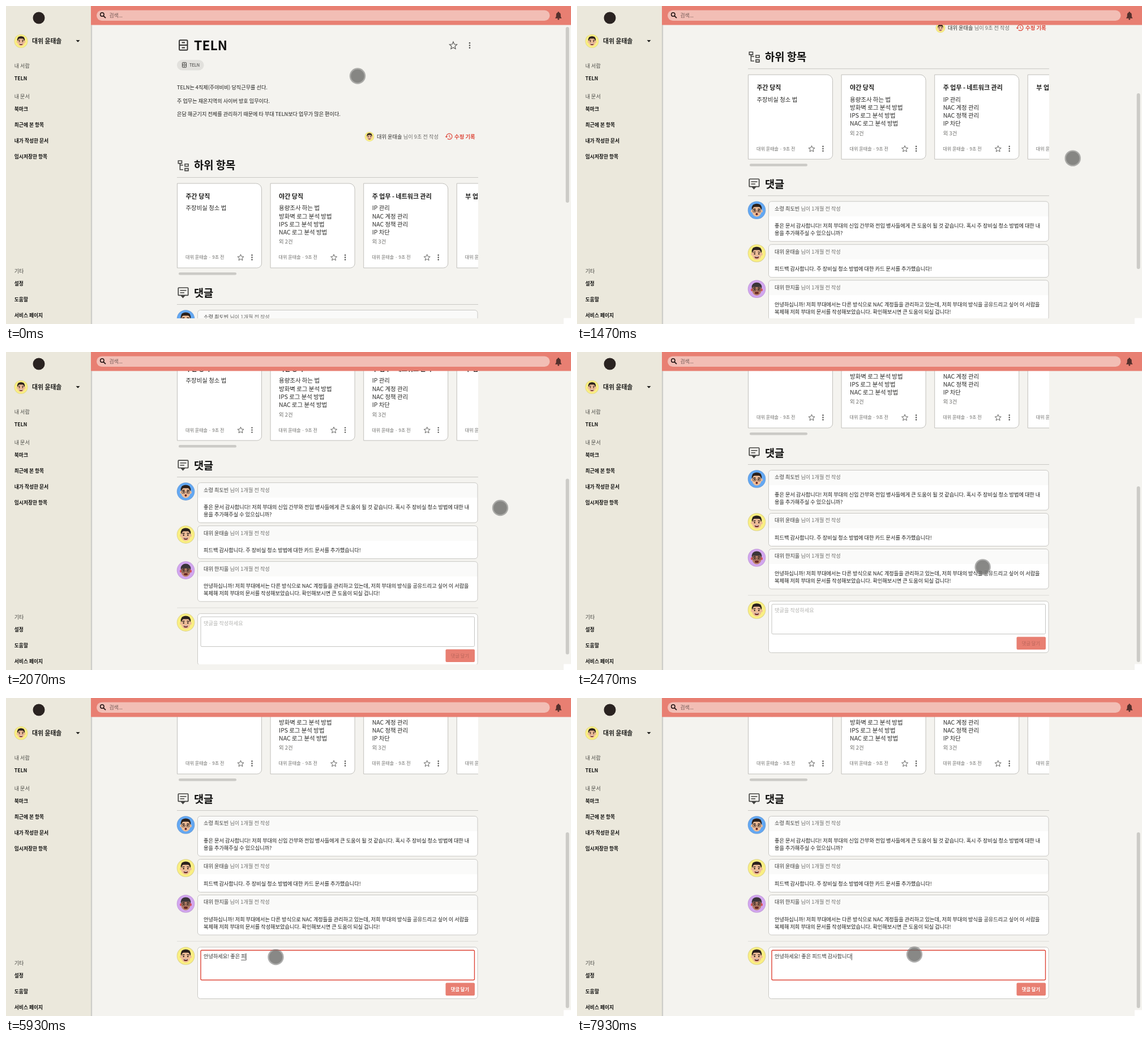
An HTML page with a canvas for the animation above (8 s loop, 998x561 px).

```html
<!DOCTYPE html>
<html lang="ko">
<head>
<meta charset="utf-8">
<title>문서 서랍</title>
<style>
html, body { margin: 0; width: 100%; height: 100%; overflow: hidden; background: #f4f3ef; }
canvas { display: block; width: 998px; height: 561px; }
</style>
</head>
<body>
<canvas id="stage"></canvas>
<script>
const W = 998, H = 561, LOOP = 8000, STEP = 1000 / 15;
const canvas = document.getElementById('stage');
const ctx = canvas.getContext('2d');
const ratio = window.devicePixelRatio || 1;
canvas.width = W * ratio;
canvas.height = H * ratio;

const FONT = '"Noto Sans CJK KR", "Noto Sans CJK", "Noto Sans", sans-serif';
const INK = '#1d1d1b', GREY = '#6f6f6c', CORAL = '#e87f72', RED = '#dd4436', LINE = '#c9c8c4';
const ME = '대위 윤태솔', TEAM = 'TELN';

// [time, value...] keys, linear in between
const SCROLL = [[1000, 0], [1133, 5], [1200, 16], [1333, 92], [1467, 192], [1533, 208],
  [1600, 208], [1733, 211], [1800, 215.5], [1933, 260], [2067, 306], [2200, 328]];
const POINTER = [[133, 621, 123.5], [400, 770, 160], [667, 888, 211], [1000, 888, 211], [1200, 886.5, 243],
  [1533, 873, 275], [2133, 873, 275], [2467, 716.5, 379.5], [2600, 560, 450], [2733, 476, 474],
  [3067, 476, 474], [3333, 476.5, 457], [7800, 476.5, 457], [7933, 596, 452.5]];

// [time, committed text, syllable being composed]
const TYPING = [[3600, '', 'ㅇ'], [3870, '', '아'], [3930, '', '안'], [4070, '안', 'ㄴ'], [4130, '안', '녀'],
  [4200, '안', '녕'], [4270, '안녕', 'ㅎ'], [4330, '안녕', '하'], [4470, '안녕', '핫'], [4530, '안녕하', '세'],
  [4600, '안녕하', '셍'], [4730, '안녕하세', '요'], [5000, '안녕하세요!', ''], [5200, '안녕하세요! ', ''],
  [5270, '안녕하세요! ', 'ㅈ'], [5330, '안녕하세요! ', '조'], [5470, '안녕하세요! ', '좋'],
  [5600, '안녕하세요! 좋', '으'], [5670, '안녕하세요! 좋', '은'], [5800, '안녕하세요! 좋은 ', ''],
  [5930, '안녕하세요! 좋은 ', '피'], [6000, '안녕하세요! 좋은 ', '핃'], [6070, '안녕하세요! 좋은 피', '드'],
  [6200, '안녕하세요! 좋은 피', '듭'], [6270, '안녕하세요! 좋은 피드', '배'], [6330, '안녕하세요! 좋은 피드', '백'],
  [6530, '안녕하세요! 좋은 피드백 ', ''], [6600, '안녕하세요! 좋은 피드백 ', 'ㄱ'], [6670, '안녕하세요! 좋은 피드백 ', '가'],
  [6730, '안녕하세요! 좋은 피드백 ', '감'], [6870, '안녕하세요! 좋은 피드백 감', 'ㅅ'],
  [6930, '안녕하세요! 좋은 피드백 감', '사'], [7070, '안녕하세요! 좋은 피드백 감사', '하'],
  [7200, '안녕하세요! 좋은 피드백 감사', '합'], [7330, '안녕하세요! 좋은 피드백 감사합', '니'],
  [7470, '안녕하세요! 좋은 피드백 감사합니', '다'], [7870, '안녕하세요! 좋은 피드백 감사합니다', '']];

function track(keys, t) {
  const i = keys.findIndex(k => k[0] > t);
  if (i === 0) return keys[0].slice(1);
  if (i < 0) return keys[keys.length - 1].slice(1);
  const a = keys[i - 1], b = keys[i], p = (t - a[0]) / (b[0] - a[0]);
  return a.slice(1).map((v, n) => v + (b[n + 1] - v) * p);
}

// y is the optical middle of the line; returns the end x
function text(s, x, y, size, color = INK, weight = 400) {
  ctx.font = `${weight} ${size}px ${FONT}`;
  ctx.fillStyle = color;
  ctx.fillText(s, x, y + size * 0.37);
  return x + ctx.measureText(s).width;
}

function box(x, y, w, h, r, fill, stroke, lw = 1) {
  ctx.beginPath();
  ctx.roundRect(x, y, w, h, r);
  if (fill) { ctx.fillStyle = fill; ctx.fill(); }
  if (stroke) { ctx.strokeStyle = stroke; ctx.lineWidth = lw; ctx.stroke(); }
}

function oval(x, y, rx, ry, fill) {
  ctx.beginPath();
  ctx.ellipse(x, y, rx, ry, 0, 0, Math.PI * 2);
  ctx.fillStyle = fill;
  ctx.fill();
}

const disc = (x, y, r, fill) => oval(x, y, r, r, fill);

function lines(color, lw, ...paths) {
  ctx.strokeStyle = color;
  ctx.lineWidth = lw;
  ctx.beginPath();
  for (const p of paths) {
    ctx.moveTo(p[0], p[1]);
    for (let i = 2; i < p.length; i += 2) ctx.lineTo(p[i], p[i + 1]);
  }
  ctx.stroke();
}

function poly(fill, ...p) {
  ctx.beginPath();
  for (let i = 0; i < p.length; i += 2) ctx.lineTo(p[i], p[i + 1]);
  ctx.closePath();
  ctx.fillStyle = fill;
  ctx.fill();
}

function star(x, y, r) {
  ctx.beginPath();
  for (let i = 0; i < 10; i++) {
    const a = -Math.PI / 2 + i * Math.PI / 5, d = i % 2 ? r * 0.45 : r;
    ctx.lineTo(x + d * Math.cos(a), y + d * Math.sin(a));
  }
  ctx.closePath();
  ctx.strokeStyle = '#575755';
  ctx.lineWidth = r * 0.16;
  ctx.stroke();
}

function dots(x, y, gap) {
  for (const d of [-gap, 0, gap]) disc(x, y + d, gap * 0.3, '#4c4c4a');
}

function cabinet(x, y, s) {
  box(x - 0.37 * s, y - 0.45 * s, 0.74 * s, 0.9 * s, 0.08 * s, null, '#333331', 0.1 * s);
  lines('#333331', 0.1 * s, [x - 0.37 * s, y, x + 0.37 * s, y],
    [x - 0.14 * s, y - 0.23 * s, x + 0.14 * s, y - 0.23 * s],
    [x - 0.14 * s, y + 0.23 * s, x + 0.14 * s, y + 0.23 * s]);
}

const LOOKS = {
  me: { bg: '#faef82', edge: '#d9d08a' },
  blue: { bg: '#63a8f3', edge: '#6f9fd6', glasses: true },
  violet: { bg: '#d2a6ef', edge: '#c09ad6', cap: true, glasses: true }
};

function avatar(x, y, r, look) {
  const { bg, edge, glasses, cap } = LOOKS[look];
  ctx.save();
  ctx.translate(x, y);
  ctx.scale(r / 16, r / 16);
  disc(0, 0, 16, edge);
  disc(0, 0, 15.2, bg);
  const skin = cap ? '#b98068' : '#eebd98', hair = cap ? '#3a3538' : '#2b211d';
  const ear = cap ? '#d9474f' : skin;
  oval(0, -3.5, 9, 8.2, hair);
  oval(-8.8, 1.5, 1.8, 2.6, ear);
  oval(8.8, 1.5, 1.8, 2.6, ear);
  oval(0, 2, 8.3, 9.6, skin);
  box(-7.4, -10.5, 14.8, cap ? 7 : 4.6, [5, 5, 2, 2], hair);
  lines('#33251f', 1.5, [-6.2, -1.8, -2, -2.4], [2, -2.4, 6.2, -1.8]);
  disc(-3.8, 1, 1.3, '#33251f');
  disc(3.8, 1, 1.3, '#33251f');
  if (glasses) {
    box(-7, -1, 5.8, 4.6, 2, null, '#4b3b38', 0.9);
    box(1.2, -1, 5.8, 4.6, 2, null, '#4b3b38', 0.9);
  }
  oval(0, 7, look === 'blue' ? 2 : 3.6, 2.1, '#6b2a26');
  if (look === 'me') box(-2.6, 5.4, 5.2, 1.3, 0.6, '#ffffff');
  ctx.restore();
}

function card(x, title, items, more) {
  box(x + 0.5, 313, 149, 149, [0, 10, 8, 0], '#ffffff', '#c0bfbb');
  text(title, x + 15.5, 336, 11, INK, 700);
  items.forEach((s, i) => text(s, x + 15.5, 356.5 + i * 14.2, 10.45, '#2a2a28'));
  if (more) text(more, x + 15.5, 416, 9.4, GREY);
  text(ME + ' · 9초 전', x + 15, 443.5, 8.1, GREY);
  star(x + 112.5, 444, 5.8);
  dots(x + 132.5, 443.5, 4);
}

function comment(y, h, look, name, body) {
  avatar(317.5, y + 15.5, 15.8, look);
  box(338.5, y, 494.5, h, 5, '#ffffff');
  box(338.5, y, 494.5, 26.5, [5, 5, 0, 0], '#fafaf9');
  box(338.5, y, 494.5, h, 5, null, LINE);
  const x = text(name, 349, y + 12.5, 9.2, '#3c3c3a');
  text(' 님이 1개월 전 작성', x, y + 12.5, 9.2, GREY);
  body.forEach((s, i) => text(s, 349, y + 42.7 + i * 13.5, 9.2));
}

function form(t) {
  avatar(317.5, 783, 15.8, 'me');
  box(338.5, 767.5, 494.5, 91, 5, '#ffffff', LINE);
  const focus = t >= 2930;
  box(344, 773, 483.5, 52.5, 2, '#ffffff', focus ? RED : '#c4c4c1', focus ? 1.4 : 1);
  const key = TYPING.filter(k => k[0] <= t + 5).pop();
  box(776.5, 830.5, 51.5, 22.5, 2, CORAL);
  text('댓글 달기', 785.8, 841.7, 8.25, key ? '#ffffff' : '#b9655b', key ? 700 : 400);
  let caret = 349;
  if (key) {
    const x = text(key[1], 349, 784, 9.2, '#333331');
    caret = x;
    if (key[2]) {
      caret = text(key[2], x, 784, 9.2, '#333331');
      lines('#333331', 0.8, [x, 790.3, caret, 790.3]);
    }
  } else {
    text('댓글을 작성하세요', 349, 784, 9.2, '#b3b3b0');
  }
  if (focus) lines('#222220', 0.8, [caret + 0.4, 778.5, caret + 0.4, 790.5]);
}

function page(t) {
  cabinet(313.3, 69, 19.5);
  text(TEAM, 332, 69, 23, '#111110', 700);
  star(790, 70, 7);
  dots(819, 69.5, 4.3);

  box(302, 95, 47.5, 18.5, 9.2, '#e2e1dd');
  cabinet(315, 104, 9.5);
  text(TEAM, 324, 104, 7.4, '#333331');

  text(TEAM + '는 4직제(주야비비) 당직근무를 선다.', 302, 144, 9.15);
  text('주 업무는 재온지역의 사이버 방호 임무이다.', 302, 167.5, 9.15);
  text(`은담 해군기지 전체를 관리하기 때문에 타 부대 ${TEAM}보다 업무가 많은 편이다.`, 302, 190.5, 9.15);

  avatar(642, 230.5, 8.4, 'me');
  const x = text(ME, 655, 230.5, 9.25, '#333331');
  text(' 님이 9초 전 작성', x, 230.5, 9.25, GREY);
  ctx.beginPath();
  ctx.arc(783, 230.2, 5, -Math.PI, Math.PI * 0.72);
  ctx.strokeStyle = RED;
  ctx.lineWidth = 1.2;
  ctx.stroke();
  poly(RED, 775.6, 230, 780.4, 230, 778, 232.6);
  lines(RED, 1, [783, 227.2, 783, 230.6, 785.3, 232]);
  text('수정 기록', 792, 230.5, 9.4, RED, 700);

  const icon = '#444442';
  box(304.3, 273, 6.2, 4.6, 0, null, icon, 1.6);
  box(316, 278.8, 6, 4, 0, null, icon, 1.6);
  box(316, 286.6, 6, 4, 0, null, icon, 1.6);
  lines(icon, 1.6, [307.4, 278, 307.4, 288.8, 313, 288.8], [307.4, 280.8, 313, 280.8]);
  text('하위 항목', 332, 281.5, 18.8, '#111110', 700);
  lines(LINE, 1, [302, 302.5, 834, 302.5]);

  ctx.save();
  ctx.beginPath();
  ctx.rect(301, 310, 533, 156);
  ctx.clip();
  card(302, '주간 당직', ['주장비실 청소 법']);
  card(466.6, '야간 당직', ['용량조사 하는 법', '방화벽 로그 분석 방법', 'IPS 로그 분석 방법', 'NAC 로그 분석 방법'], '외 2건');
  card(631.2, '주 업무 - 네트워크 관리', ['IP 관리', 'NAC 계정 관리', 'NAC 정책 관리', 'IP 차단'], '외 3건');
  card(795.8, '부 업무', []);
  ctx.restore();
  box(305, 470, 102, 4.5, 2.2, '#cbcac6');

  box(304.3, 497, 17.4, 13.4, 1, null, icon, 1.7);
  poly(icon, 308, 510.5, 317, 510.5, 312.5, 515.5);
  lines(icon, 1.5, [307.5, 501.7, 318.5, 501.7], [307.5, 505.7, 315, 505.7]);
  text('댓글', 332, 505.7, 18.6, '#111110', 700);
  lines(LINE, 1, [302, 526.5, 834, 526.5]);

  comment(536.5, 70.5, 'blue', '소령 최도빈', [
    '좋은 문서 감사합니다! 저희 부대의 신임 간부와 전입 병사들에게 큰 도움이 될 것 같습니다. 혹시 주 장비실 청소 방법에 대한 내',
    '용을 추가해주실 수 있으십니까?']);
  comment(612.5, 58, 'me', ME, ['피드백 감사합니다. 주 장비실 청소 방법에 대한 카드 문서를 추가했습니다!']);
  comment(675.5, 70.5, 'violet', '대위 한지울', [
    '안녕하십니까! 저희 부대에서는 다른 방식으로 NAC 계정들을 관리하고 있는데, 저희 부대의 방식을 공유드리고 싶어 이 서랍을',
    '복제해 저희 부대의 문서를 작성해보았습니다. 확인해보시면 큰 도움이 되실 겁니다!']);
  lines('#dddcd8', 1, [302, 757.2, 834, 757.2]);
  form(t);
}

function topBar() {
  box(150, 0, 848, 33.5, 0, CORAL);
  box(160, 7.5, 800.5, 18.5, 9.2, '#f2beb5');
  ctx.beginPath();
  ctx.arc(169.8, 15, 3.2, 0, Math.PI * 2);
  ctx.strokeStyle = '#1f1312';
  ctx.lineWidth = 1.5;
  ctx.stroke();
  lines('#1f1312', 1.8, [172, 17.3, 176, 21.2]);
  text('검색...', 182.5, 16.3, 8.8, '#6d5552');
  const bell = '#54302c';
  box(971.8, 11.5, 8, 9.5, [4, 4, 0, 0], bell);
  poly(bell, 971.8, 18.5, 979.8, 18.5, 981.5, 21.8, 970, 21.8);
  disc(975.8, 11.3, 1.2, bell);
  disc(975.8, 23, 1.5, bell);
}

function sideBar() {
  const shade = ctx.createLinearGradient(150, 0, 153, 0);
  shade.addColorStop(0, 'rgba(0,0,0,.24)');
  shade.addColorStop(1, 'rgba(0,0,0,0)');
  box(150, 33.5, 3, H, 0, shade);
  box(0, 0, 150, H, 0, '#ebe8dc');
  disc(58, 21, 10.5, '#2a2321');
  avatar(26.5, 62, 12, 'me');
  text(ME, 46, 62, 10.85, INK, 700);
  poly('#111110', 123.5, 60.2, 130.5, 60.2, 127, 63.8);
  const head = (s, y) => text(s, 14.8, y, 9, '#484844');
  const item = (s, y) => text(s, 14.8, y, 8.75, '#111110', 700);
  head('내 서랍', 106);
  item(TEAM, 128);
  head('내 문서', 159.5);
  item('북마크', 182);
  item('최근에 본 항목', 209.5);
  item('내가 작성한 문서', 237.7);
  item('임시저장한 항목', 265.5);
  head('기타', 468);
  item('설정', 490);
  item('도움말', 518);
  item('서비스 페이지', 546);
}

function draw(t) {
  const [scroll] = track(SCROLL, t), [px, py] = track(POINTER, t);
  ctx.setTransform(ratio, 0, 0, ratio, 0, 0);
  box(0, 0, W, H, 0, '#f4f3ef');
  ctx.save();
  ctx.beginPath();
  ctx.rect(150, 33, 848, 518);
  ctx.clip();
  ctx.translate(0, -scroll);
  page(t);
  ctx.restore();
  box(988.7, 37 + scroll * 0.61, 6, 310, 3, '#cccbc7');
  box(985, 550.5, 13, 10.5, 0, '#ffffff');
  topBar();
  sideBar();
  disc(px, py, 14.2, 'rgba(125,125,122,.62)');
  disc(px, py, 11.8, 'rgba(98,98,96,.5)');
}

// motion advances in 15 steps a second
function tick(now) {
  const t = now % LOOP;
  draw(Math.floor((t + 5) / STEP) * STEP);
  requestAnimationFrame(tick);
}
requestAnimationFrame(tick);
</script>
</body>
</html>
```
